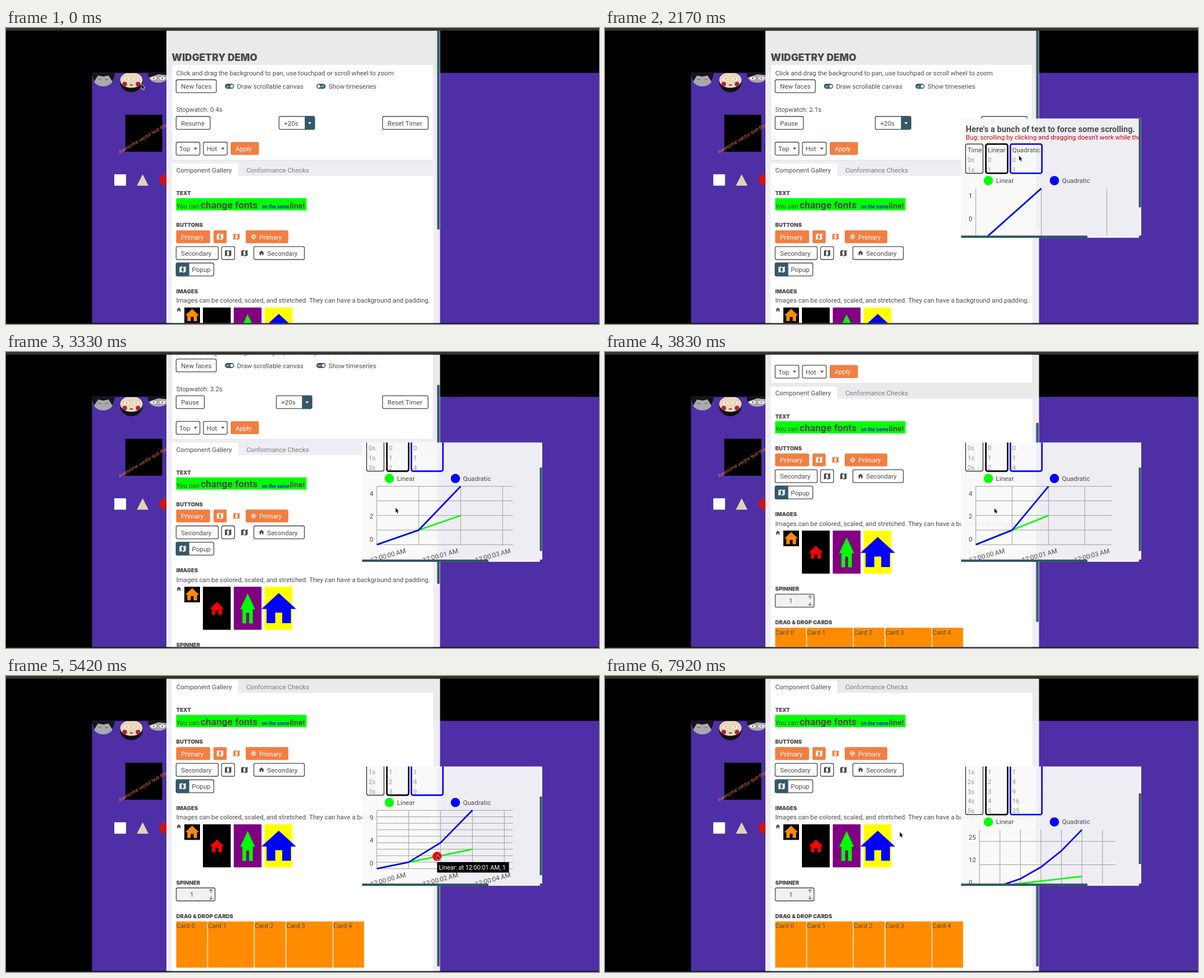
Recreate the animation shown at these times as an HTML page with a canvas. Size 1024 by 512 pixels, loop 8 s.

```html
<!DOCTYPE html>
<html lang="en">
<head>
<meta charset="utf-8">
<title>Widgetry demo</title>
<style>
html, body { margin: 0; width: 100%; height: 100%; overflow: hidden; background: #000; }
canvas { display: block; width: 1024px; height: 512px; }
</style>
</head>
<body>
<canvas id="stage" width="1024" height="512"></canvas>
<script>
const ctx = document.getElementById('stage').getContext('2d');
const LOOP = 8000, ROW = 16.8;
const INK = '#4c4c4c', TEAL = '#355868', ORANGE = '#f27e42', PANEL = 'rgba(249,249,249,.94)';
const MAP = new Path2D('M0 1.5L3.6 0L7.4 1.5L11 0V9.5L7.4 11L3.6 9.5L0 11ZM3.8 1.6V8.4L7.2 9.6V2.8Z');

// ---- drawing helpers; text is placed by the middle of its capitals ----
function text(s, x, y, color = INK, size = 11.2, weight = 400, align = 'left', family = 'Roboto') {
  ctx.font = `${weight} ${size}px ${family}, sans-serif`;
  ctx.textAlign = align;
  ctx.fillStyle = color;
  ctx.fillText(s, x, y + size * 0.355);
}
const heading = (s, x, y, size = 9.3) => text(s, x, y, INK, size, 900, 'left', 'Inter');

function rect(x, y, w, h, color) {
  ctx.fillStyle = color;
  ctx.fillRect(x, y, w, h);
}
function box(x, y, w, h, { fill, stroke, width = 1.3, r = 2.5 }) {
  ctx.beginPath();
  ctx.roundRect(x, y, w, h, r);
  if (fill) { ctx.fillStyle = fill; ctx.fill(); }
  if (stroke) { ctx.strokeStyle = stroke; ctx.lineWidth = width; ctx.stroke(); }
}
function poly(points, color) {
  ctx.beginPath();
  points.forEach(([x, y]) => ctx.lineTo(x, y));
  ctx.closePath();
  ctx.fillStyle = color;
  ctx.fill();
}
function line(points, color, width = 1) {
  ctx.beginPath();
  points.forEach(([x, y]) => ctx.lineTo(x, y));
  ctx.strokeStyle = color;
  ctx.lineWidth = width;
  ctx.stroke();
}
function oval(x, y, rx, ry, color) {
  ctx.beginPath();
  ctx.ellipse(x, y, rx, ry, 0, 0, 7);
  ctx.fillStyle = color;
  ctx.fill();
}
function clipped(x, y, w, h, draw) {
  ctx.save();
  ctx.beginPath();
  ctx.rect(x, y, w, h);
  ctx.clip();
  draw();
  ctx.restore();
}

// ---- widgets ----
function button(label, x, y, w, primary, textX = x + 8.5) {
  box(x, y, w, 22.3, primary ? { fill: ORANGE } : { fill: '#fff', stroke: INK });
  text(label, textX, y + 11.8, primary ? '#fff' : INK);
}
function mapIcon(x, y, color) {
  ctx.save();
  ctx.translate(x - 5.5, y - 5.5);
  ctx.fillStyle = color;
  ctx.fill(MAP, 'evenodd');
  ctx.restore();
}
function house(x, y, w, h, color) {
  const half = [[.5, 0], [1, .53], [.85, .53], [.85, 1], [.6, 1], [.6, .65]];
  const all = half.concat(half.slice(1).reverse().map(([u, v]) => [1 - u, v]));
  poly(all.map(([u, v]) => [x + u * w, y + v * h]), color);
}
const caret = (x, y, color) => poly([[x - 3, y - 1.5], [x + 3, y - 1.5], [x, y + 2]], color);

function toggle(x, y, on) {
  box(x, y - 4.5, 16, 8.6, { fill: TEAL, r: 4.3 });
  oval(x + (on ? 12 : 4), y - 0.2, 2.6, 2.6, '#fff');
  text(on ? 'on' : 'off', x + (on ? 2.2 : 7.4), y, '#fff', 5);
}
function dropdown(label, x) {
  button(label, x, 197.5, 41, false, x + 5.5);
  caret(x + 33.5, 208.5, INK);
}
function target(x, y) {
  ctx.beginPath();
  ctx.arc(x, y, 3.1, 0, 7);
  ctx.strokeStyle = '#fff';
  ctx.lineWidth = 1.1;
  ctx.stroke();
  oval(x, y, 1.4, 1.4, '#fff');
  for (const [u, v] of [[1, 0], [-1, 0], [0, 1], [0, -1]])
    line([[x + 3 * u, y + 3 * v], [x + 4.8 * u, y + 4.8 * v]], '#fff');
}
function arrow(x, y, dir) {
  line([[x, y + 3 * dir], [x, y - 3 * dir]], INK);
  line([[x - 3, y], [x, y - 3 * dir], [x + 3, y]], INK);
}

// ---- timeline ----
function track(keys, t) {
  const i = keys.findIndex(k => k[0] > t);
  if (i < 0) return keys[keys.length - 1].slice(1);
  const a = keys[i - 1], b = keys[i], u = (t - a[0]) / (b[0] - a[0]);
  const s = u * u * (3 - 2 * u);
  return a.slice(1).map((v, j) => v + (b[j + 1] - v) * s);
}
const CURSOR = [
  [0, 234, 97], [80, 234, 97], [420, 316, 161], [520, 316, 161], [760, 541, 98], [1730, 543, 98],
  [2120, 715, 221], [2300, 715, 221], [2750, 673, 269], [4580, 672, 271], [4900, 738, 320],
  [5080, 744.5, 310], [5500, 744.5, 310], [5900, 731, 275], [6420, 731, 275], [6900, 902, 290],
  [7200, 860, 285], [7830, 509, 270]
];
const scrollAt = t => 227 * Math.min(1, Math.max(0, t < 3333
  ? (t - 2830) / 500 * 0.341 : 0.341 + (t - 3333) / 770 * 0.659));

// The clock stands still in the plot while the pointer inspects it.
function elapsedAt(t) {
  const s = t / 1000;
  if (s < 0.49) return 0.4;
  return s < 4.34 ? s - 0.09 : Math.max(4.27, s - 1.28);
}

// ---- scene ----
function faces() {
  oval(168, 87, 17.5, 14, '#a9a9ae');
  poly([[148, 78], [187.5, 78], [187.5, 80], [168, 84], [148, 80]], '#151515');
  for (const side of [-1, 1]) {
    poly([[168 + side * 20, 79], [168 + side * 9, 82], [168 + side * 16, 93]], '#151515');
    line([[168 + side * 3, 89.5], [168 + side * 9, 88.5]], '#666');
  }

  oval(216.5, 93.5, 19.5, 17.5, '#101010');
  oval(216.5, 90, 19.3, 13.5, '#e8d8b8');
  for (const side of [-1, 1]) {
    oval(216.5 + side * 11.5, 97, 4, 4, '#a8224a');
    oval(216.5 + side * 8, 88, 4.5, 2, '#fff');
    oval(216.5 + side * 8, 88, 1, 1, '#a22');
  }
  oval(216.5, 98.5, 3, 0.9, '#8d2030');

  oval(263, 83, 17, 11.5, '#a9a9ae');
  poly([[245, 78], [281, 78], [281, 82], [263, 80], [246, 86]], '#151515');
  for (const x of [255, 270]) {
    oval(x, 87, 5, 2.4, '#fff');
    oval(x, 87, 1.3, 1.3, '#a22');
  }
}

function background() {
  rect(0, 0, 1024, 512, '#000');
  rect(148.5, 77.5, 876, 433, '#4e2fa6');
  clipped(148, 78, 140, 60, faces);
  rect(206, 150, 64, 64, '#000');
  ctx.save();
  ctx.translate(195, 215);
  ctx.rotate(-0.53);
  text('Awesome vector text thanks', 0, 0, '#e8743b', 8.6);
  ctx.restore();
  rect(187, 253, 20.3, 19.7, '#fff');
  poly([[236, 253], [226, 272.7], [246, 272.7]], '#e2d3b6');
  oval(275, 263, 10, 10, '#d8151b');
  for (let x = 267; x < 278; x += 3)
    for (let y = 256; y < 272; y += 3) rect(x, y, 1, 1, '#6a0a10');
}

function controls(t, elapsed) {
  const running = t >= 490;
  heading('WIDGETRY DEMO', 286, 51, 16.8);
  box(286, 63, 452, 165.5, { fill: '#fff', stroke: '#e3e0e8', width: 1, r: 2 });
  text('Click and drag the background to pan, use touchpad or scroll wheel to zoom', 294, 78.5);
  button('New faces', 293.8, 89.5, 69.4);
  toggle(378, 101, true);
  text('Draw scrollable canvas', 399, 101.3);
  toggle(536, 101, t >= 1700);
  text('Show timeseries', 557, 101.3);
  text(`Stopwatch: ${elapsed.toFixed(1)}s`, 294, 141.5);
  button(running ? 'Pause' : 'Resume', 293.8, 153, running ? 48.7 : 58.7);

  const x = running ? 466.8 : 471.5;
  button('+20s', x, 153, 61.3);
  box(x + 45, 153, 16.3, 22.3, { fill: TEAL, stroke: TEAL, r: [0, 2.5, 2.5, 0] });
  caret(x + 53, 164.5, '#fff');
  button('Reset Timer', 650.3, 153, 78.6);

  dropdown('Top', 293.8);
  dropdown('Hot', 341);
  button('Apply', 388, 197.2, 48.7, true);
}

function gallery() {
  box(286, 234.5, 115, 30, { fill: '#fff', r: 2 });
  rect(286, 256, 452, 600, '#fff');
  text('Component Gallery', 294, 246, INK, 11.3);
  text('Conformance Checks', 415, 246, '#7b7b7b', 11.3);

  heading('TEXT', 294, 286);
  rect(294, 294.3, 225, 21.2, '#0f0');
  text('You can', 294, 308);
  text('change fonts', 336, 306, INK, 16.8, 700);
  text('on the same', 442, 309, '#00f', 8.6, 500);
  text('line!', 490, 307, INK, 13.6, 700);

  heading('BUTTONS', 294, 341);
  button('Primary', 293.8, 350, 58.7, true);
  box(358.3, 350, 22.7, 22.3, { fill: ORANGE });
  mapIcon(369.6, 361, '#fff');
  mapIcon(398, 361, ORANGE);
  button('Primary', 414, 350, 73.5, true, 437.5);
  target(427.5, 361);
  button('Secondary', 293.8, 378.2, 72.7);
  box(372.3, 378.2, 22.4, 22.3, { fill: '#fff', stroke: INK });
  mapIcon(383.5, 389.5, INK);
  mapIcon(411.7, 389.5, INK);
  button('Secondary', 428, 378.2, 87.3, false, 451);
  house(436.5, 385, 9.5, 8, INK);
  button('Popup', 293.8, 406.5, 65, false, 321);
  box(293.8, 406.5, 22, 22.3, { fill: TEAL, stroke: TEAL, r: [2.5, 0, 0, 2.5] });
  mapIcon(305, 417.7, '#fff');

  heading('IMAGES', 294, 455.5);
  text('Images can be colored, scaled, and stretched. They can have a background and padding.', 294, 471.5);
  house(294.5, 483.5, 8, 7, INK);
  rect(308, 483.5, 27, 27, '#000');
  house(309.5, 486, 24, 21, '#ff8c00');
  rect(340, 483.5, 48, 74.5, '#000');
  house(352, 510, 24.5, 22, '#f00');
  rect(393.3, 483.5, 48, 74.5, '#800080');
  house(404.5, 495, 25.5, 52, '#0f0');
  rect(446.5, 483.5, 48, 74.5, '#ff0');
  house(441, 494.5, 60, 52, '#00f');

  heading('SPINNER', 294, 584.5);
  box(294, 593.5, 67, 22.5, { fill: '#f1f1f1', stroke: INK });
  text('1', 321, 605, INK, 11.2, 400, 'center');
  arrow(354, 599, 1);
  arrow(354, 610.5, -1);

  heading('DRAG & DROP CARDS', 294, 642.5);
  [[294, 53.5], [348.7, 79.5], [429.5, 53.3], [484.1, 79.8], [565.1, 53.2]].forEach(([x, w], i) => {
    rect(x, 651.5, w, 80, '#ff8c00');
    text(`Card ${i}`, x, 659.5);
  });
}

function mainPanel(t, elapsed, scroll) {
  rect(277, 4.5, 472.5, 506, PANEL);
  clipped(277, 4.5, 467, 506, () => {
    ctx.translate(0, -scroll);
    controls(t, elapsed);
    gallery();
  });
  rect(744.5, 4.5 + scroll * 0.677, 4.2, 344, TEAL);
}

function table(rows) {
  const columns = [
    ['Time', 622.7, 30, '#222', 1.2, i => i + 's'],
    ['Linear', 657.7, 37.6, '#000', 2.6, i => i],
    ['Quadratic', 700, 54.5, '#00f', 2.6, i => i * i]
  ];
  for (const [name, x, w, stroke, width, cell] of columns) {
    box(x, 200.7, w, 17 + ROW * rows, { stroke, width, r: 3 });
    text(name, x + 3.2, 211.5);
    for (let i = 0; i < rows; i++) text(cell(i), x + 3.2, 228 + ROW * i, '#999');
  }
}

function plot(rows, elapsed) {
  const top = 277.5 + ROW * (rows - 2), height = 101, bottom = top + height, width = 235;
  const max = (rows - 1) ** 2;
  [[662, '#0f0', 'Linear'], [776, '#00f', 'Quadratic']].forEach(([x, color, name]) => {
    oval(x, top - 13.5, 8, 8, color);
    text(name, x + 13.2, top - 13.5);
  });
  [max, max >> 1, 0].forEach((v, i) => text(v, 628, top + 12.8 + 39.4 * i));

  const left = 634 + ctx.measureText(max).width;
  const px = s => left + s / elapsed * width;
  const py = v => bottom - v / Math.max(1, max) * height;
  for (let s = 0; s <= elapsed; s++) line([[px(s), top], [px(s), bottom]], '#a0a0a0');
  const step = max < 10 ? 1 : 10;
  if (max > 1)
    for (let v = step === 1 ? 0 : step; v <= max; v += step)
      line([[left, py(v)], [left + width, py(v)]], '#a0a0a0');

  const seconds = [...Array(rows).keys()];
  line(seconds.map(s => [px(s), py(s)]), '#0f0', 2.7);
  line(seconds.map(s => [px(s), py(s * s)]), '#00f', 2.7);

  for (let i = 0; i < 3; i++) {
    ctx.save();
    ctx.translate(690 + 90.5 * i, bottom + 10);
    ctx.rotate(-0.27);
    text(`12:00:0${Math.floor(elapsed * i / 2)} AM`, 0, 0, INK, 11.2, 400, 'right');
    ctx.restore();
  }
  return { px, py };
}

function chartPanel(t, elapsed, scroll, [cx, cy]) {
  const rows = Math.floor(elapsed);
  const offset = Math.min(scroll, 62 + ROW * Math.max(0, Math.min(rows, 4) - 3));
  rect(614.7, 156.5, 307.3, 206, PANEL);
  rect(922, 156.5, 4, 202.5, '#f6f4f9');
  let scale;
  clipped(615, 156.5, 307, 203, () => {
    ctx.translate(0, -offset);
    text("Here's a bunch of text to force some scrolling.", 623, 174.5, INK, 14.2, 700);
    text("Bug: scrolling by clicking and dragging doesn't work while the mouse is over", 623, 189.5, '#c80000', 11.2);
    table(rows);
    scale = plot(rows, elapsed);
  });
  const content = 276 + 18 * (rows - 2), ratio = 206 / content;
  rect(615, 359, 307, 3.7, '#f6f4f9');
  rect(921.7, 156.5 + offset * ratio, 4, 206 * ratio, TEAL);
  rect(615, 359, 218, 4, TEAL);

  if (t >= 4880 && t < 5560) {
    oval(cx, scale.py((cx - scale.px(0)) / (scale.px(1) - scale.px(0))) - offset, 8, 8, '#f00');
    rect(cx, cy + 12, 124, 18, '#000');
    text('Linear: at 12:00:01 AM, 1', cx + 3, cy + 21.5, '#fff', 10.5);
  }
}

function cursor([x, y]) {
  const shape = [[0, 0], [0, 8], [1.8, 6.6], [3.2, 9.6], [4.6, 9], [3.3, 6], [5.6, 5.8]];
  const points = shape.map(([u, v]) => [x + u, y + v]);
  line([...points, points[0]], '#fff', 1.2);
  poly(points, '#111');
}

function render(t) {
  const elapsed = elapsedAt(t), scroll = scrollAt(t), pointer = track(CURSOR, t);
  background();
  mainPanel(t, elapsed, scroll);
  if (t >= 1740) chartPanel(t, elapsed, scroll, pointer);
  rect(0, 0, 1024, 4.5, '#333');
  rect(0, 510.5, 1024, 1.5, '#1c1c1c');
  cursor(pointer);
}

function tick() {
  const t = performance.now() % LOOP;
  render(Math.floor(t * 0.012 + 0.1) / 0.012);
  requestAnimationFrame(tick);
}
tick();
</script>
</body>
</html>
```
